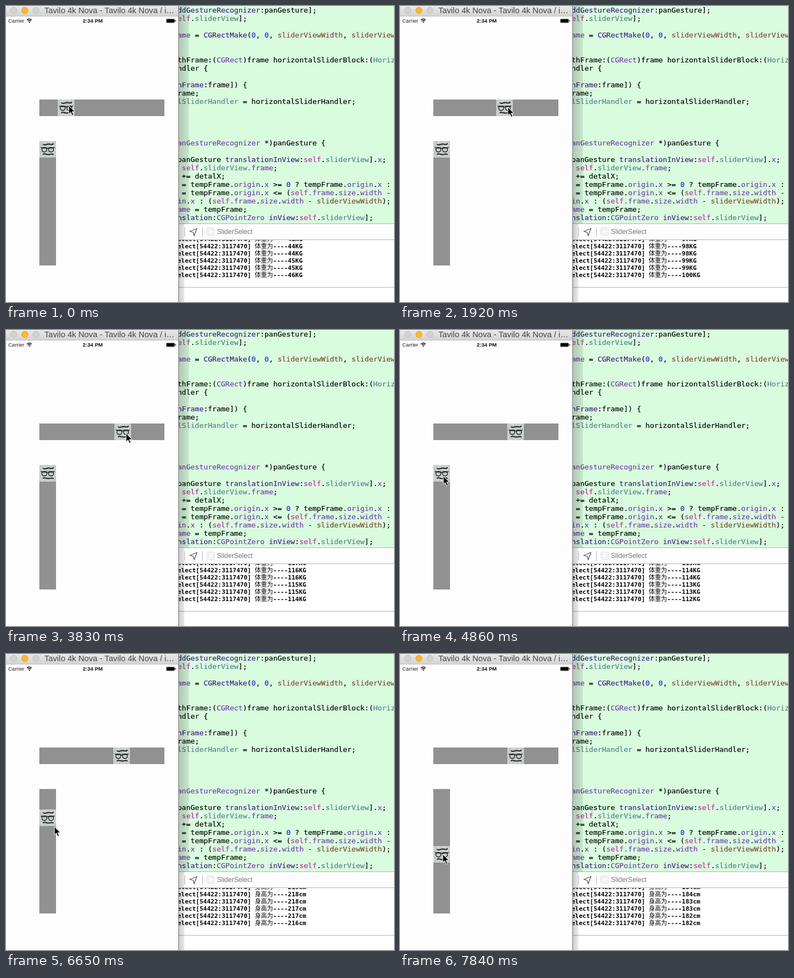
Write an HTML page that moves like this. It is 698 px wide and 535 px high and loops after 8 s.

```html
<!DOCTYPE html>
<html lang="zh-CN">
<head>
<meta charset="utf-8">
<title>Slider demo</title>
<style>
html, body { margin: 0; width: 100%; height: 100%; overflow: hidden; background: #fff; }
pre, svg, div { position: absolute; margin: 0; }
#editor { left: 310px; top: 0; width: 388px; height: 394px; background: #d9fbde; overflow: hidden; }
#code { left: -1.5px; top: 0; font: 13px/15px "DejaVu Sans Mono", monospace; color: #000; -webkit-text-stroke: .15px; }
#console { left: 310px; top: 423px; width: 388px; height: 85px; overflow: hidden; }
#log { left: -1.5px; top: -8px; font: bold 11px/13px "DejaVu Sans Mono", "Noto Sans CJK SC", "Noto Sans CJK", monospace; color: #000; }
#log i { font-style: normal; font-weight: 500; }
svg { left: 0; top: 0; font-family: "Liberation Sans", Arial, sans-serif; }
</style>
</head>
<body>
<div id="editor"><pre id="code"></pre></div>
<div id="console"><pre id="log"></pre></div>
<svg width="698" height="535" viewBox="0 0 698 535">
  <defs>
    <linearGradient id="bar" x2="0" y2="1"><stop stop-color="#e9e9e9"/><stop offset="1" stop-color="#d3d3d3"/></linearGradient>
    <linearGradient id="shade"><stop stop-opacity=".2"/><stop offset="1" stop-opacity=".08"/></linearGradient>
    <g id="thumb">
      <rect width="30" height="30" fill="#c8cdc6"/>
      <path id="dark" fill="#b4bab3"/>
      <path id="light" fill="#dde0da"/>
      <g fill="none" stroke="#20242c" stroke-linecap="round">
        <path d="M7 6q2 1.500 5 .5q5-1.500 8-.5q4 1 5-1M7 24q1-1 4-.5q5 1.500 9 .5q3-1 5 .5M5 12.500h8M17 12.500h8" stroke-width="2"/>
        <path d="M13.500 14q1.500-1.300 3 0M4.500 12.500l-1.500-.5M25.500 12.500l1.500-.5" stroke-width="1.500"/>
        <ellipse cx="9" cy="15.800" rx="4.500" ry="4" stroke-width="1.400"/>
        <ellipse cx="21" cy="15.800" rx="4.500" ry="4" stroke-width="1.400"/>
      </g>
    </g>
  </defs>

  <!-- debug toolbar -->
  <rect x="310" y="394" width="388" height="28" fill="#fdfdfd"/>
  <path d="M310 393.500h388M310 422.500h388M310 508.500h388" stroke="#b4b4b4"/>
  <path d="M321.500 400v17M353.500 400v17" stroke="#bdbdbd"/>
  <path d="M343.500 402l-13 5.500 6.500 1.500 1.500 6.500z" fill="none" stroke="#555" stroke-width="1.200" stroke-linejoin="round"/>
  <rect x="361.500" y="401.500" width="13" height="13" rx="2" fill="none" stroke="#bbb" stroke-dasharray="2 1.500"/>
  <rect x="364.500" y="404.500" width="7" height="7" fill="none" stroke="#ccc" stroke-dasharray="2 1.500"/>
  <text x="379.500" y="412" font-size="12" fill="#777">SliderSelect</text>

  <!-- simulator window -->
  <rect x="311" width="18" height="394" fill="url(#shade)"/>
  <rect x="311" y="394" width="10" height="141" fill="url(#shade)"/>
  <rect width="310" height="535" fill="#fdfdfd"/>
  <rect width="310" height="18" fill="url(#bar)"/>
  <path d="M0 18.500h310" stroke="#c4c4c4"/>
  <path d="M310.500 0v535" stroke="#777"/>
  <g stroke-width=".8">
    <circle cx="14" cy="8" r="5.800" fill="#d2d2d2" stroke="#bbb"/>
    <circle cx="34" cy="8" r="5.800" fill="#fdb62b" stroke="#e0a02a"/>
    <circle cx="54" cy="8" r="5.800" fill="#d2d2d2" stroke="#bbb"/>
  </g>
  <text x="69" y="13" font-size="14.700" fill="#444">Tavilo 4k Nova - Tavilo 4k Nova / i…</text>
  <text x="4" y="30" font-size="9.500" fill="#222">Carrier</text>
  <text x="138" y="30" font-size="9.500" font-weight="bold" fill="#111">2:34 PM</text>
  <path d="M37.500 25.500q4.500-4 9 0M39.300 27.500q2.700-2.400 5.400 0" fill="none" stroke="#111" stroke-width="1.300"/>
  <circle cx="42" cy="29.300" r="1.100" fill="#111"/>
  <rect x="288.400" y="23.400" width="15" height="6.800" rx="1.500" fill="#333" stroke="#777" stroke-width=".8"/>
  <rect x="289.500" y="24.300" width="12.800" height="5" rx=".5"/>
  <rect x="304.300" y="25.300" width="1.200" height="3" rx=".5"/>

  <rect x="60" y="169" width="225" height="30" fill="#919191"/>
  <rect x="60" y="244" width="30" height="225" fill="#919191"/>
  <use id="weight" href="#thumb"/>
  <use id="height" href="#thumb"/>
  <path id="cursor" d="M0 0V15l3.500-3.200 2.600 5.900 2.500-1.100-2.600-5.700h4.800z" fill="#000" stroke="#fff"/>
</svg>
<script>
const $ = id => document.getElementById(id);

const source = `ddGestureRecognizer:panGesture];
elf.sliderView];

ame = CGRectMake(0, 0, sliderViewWidth, sliderViewWidth


thFrame:(CGRect)frame horizontalSliderBlock:(HorizontalBlock
ndler {

nFrame:frame]) {
rame;
lSliderHandler = horizontalSliderHandler;




anGestureRecognizer *)panGesture {

panGesture translationInView:self.sliderView].x;
 self.sliderView.frame;
 += detalX;
 = tempFrame.origin.x >= 0 ? tempFrame.origin.x :
 = tempFrame.origin.x <= (self.frame.size.width -
in.x : (self.frame.size.width - sliderViewWidth);
ame = tempFrame;
nslation:CGPointZero inView:self.sliderView];`;

const palette = {
  '#bb2ca2': 'self elf',
  '#4f8187': 'sliderView lSliderHandler HorizontalBlock',
  '#703daa': 'ame CGRect CGPointZero origin in x .frame size width anGestureRecognizer',
  '#3d1d81': 'ddGestureRecognizer CGRectMake nFrame translationInView nslation inView',
  '#78492a': 'sliderViewWidth',
  '#272ad8': '0'
};
const colors = {};
for (const [color, words] of Object.entries(palette))
  for (const word of words.split(' ')) colors[word] = color;

$('code').innerHTML = source.replace(/</g, '&lt;').replace(/\.frame|\w+/g,
  word => colors[word] ? `<span style="color:${colors[word]}">${word}</span>` : word);

// Grain on the thumb picture.
let seed = 7;
const random = n => (seed = seed * 16807 % 2147483647) % n;
for (const id of ['dark', 'light']) {
  let d = '';
  for (let i = 0; i < 110; i++) d += `M${random(30)} ${random(30)}h1v1h-1z`;
  $(id).setAttribute('d', d);
}

// Linear track of [tick, value, ...] rows.
function at(track, tick, i) {
  const k = Math.max(1, track.findIndex(row => row[0] >= tick));
  const a = track[k - 1], b = track[k];
  return a[i] + (b[i] - a[i]) * (tick - a[0]) / (b[0] - a[0]);
}

const TICK = 147.92, LOOP = 8000;
const DROP = 26.5, GRAB = 35, END = 50;   // ticks: weight released, height grabbed, height released
const TURN = 125, KG_PER_PX = 0.664;      // the weight drag reverses after TURN px
const TALLEST = 231;

// After the first drag: tick, cursor x, cursor y, height knob offset, height reading
const path = [
  [DROP, 214, 187, 0, TALLEST], [30, 53, 250, 0, TALLEST], [32, 79, 264, 0, TALLEST],
  [GRAB, 78, 264, 0, TALLEST], [40, 84, 284, 13, 225.4], [45, 87, 312, 37, 216.3], [END, 77, 362, 103, 181.9]
];

const travelled = tick => tick * (6.786 - 0.0429 * tick);
const fold = px => TURN - Math.abs(TURN - px);

// Readings are logged at every half unit of movement.
function logLine(px, height, back) {
  const tall = height + back / 2;
  const [label, value, unit] = tall < TALLEST
    ? ['身高为', tall, 'cm']
    : ['体重为', 45.9 + KG_PER_PX * fold(px - back / 2 / KG_PER_PX), 'KG'];
  return `elect[54422:3117470] <i>${label}</i>----${Math.round(value)}${unit}`;
}

const move = (id, x, y) => $(id).setAttribute('transform', `translate(${Math.floor(x)} ${Math.floor(y)})`);

let shown = -1;
function draw(now) {
  const tick = Math.floor((now % LOOP + 25) / TICK);
  if (tick !== shown) {
    shown = tick;
    const px = travelled(Math.min(tick, DROP));
    const knobX = 93 + fold(px);
    const [x, y, offset, height] = [1, 2, 3, 4].map(i => at(path, Math.min(Math.max(tick, DROP), END), i));
    move('weight', knobX, 169);
    move('height', 60, 244 + offset);
    if (tick < DROP) move('cursor', knobX + 20.500, 180.500 + tick / 4);
    else move('cursor', x, y);
    $('log').innerHTML = [5, 4, 3, 2, 1, 0].map(back => logLine(px, height, back)).join('\n');
  }
  requestAnimationFrame(() => draw(performance.now()));
}
draw(0);
</script>
</body>
</html>
```
